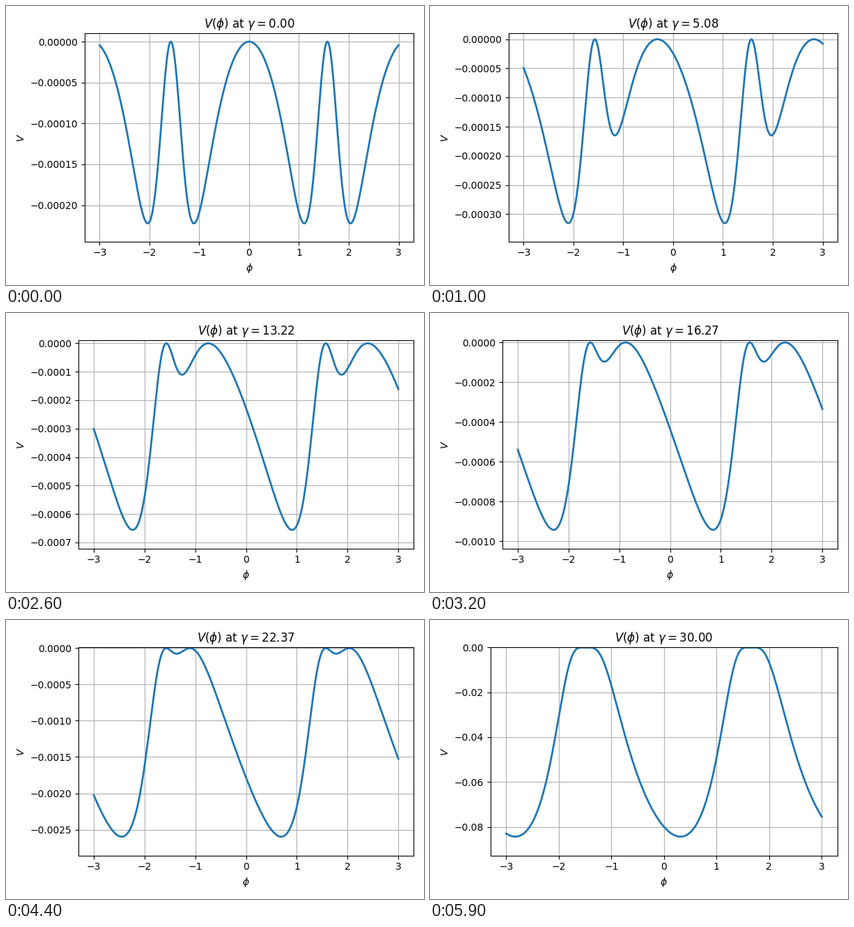
These frames come from a looping animation (600x400 px, 6 s). A matplotlib script:

```python
import numpy as np
import matplotlib.pyplot as plt
from matplotlib.animation import FuncAnimation

FRAMES = 60
LIMIT = 1000  # the potential diverges at gamma**2 == LIMIT

phi = np.linspace(-3, 3, 500)
gammas = np.linspace(0, 30, FRAMES)


def potential(gamma):
    gap = LIMIT - gamma**2
    c, s = np.cos(phi), np.sin(phi)
    tilt = 2 * gamma / np.sqrt(gap)
    ratio = c * (s + tilt * c) / (s**2 + 4 * c**2)
    return -32 / (9 * gap) * ratio**2


fig, ax = plt.subplots(figsize=(6, 4), dpi=100)


def draw(i):
    v = potential(gammas[i])
    ax.clear()
    ax.plot(phi, v, lw=2)
    ax.set_ylim(1.1 * v.min(), 1e-5)
    ax.set_xlabel(r"$\phi$")
    ax.set_ylabel(r"$V$")
    ax.set_title(rf"$V(\phi)$ at $\gamma = {gammas[i]:.2f}$")
    ax.grid(True)
    fig.tight_layout()


anim = FuncAnimation(fig, draw, frames=FRAMES, interval=100, repeat=True, repeat_delay=0)
plt.show()
```
